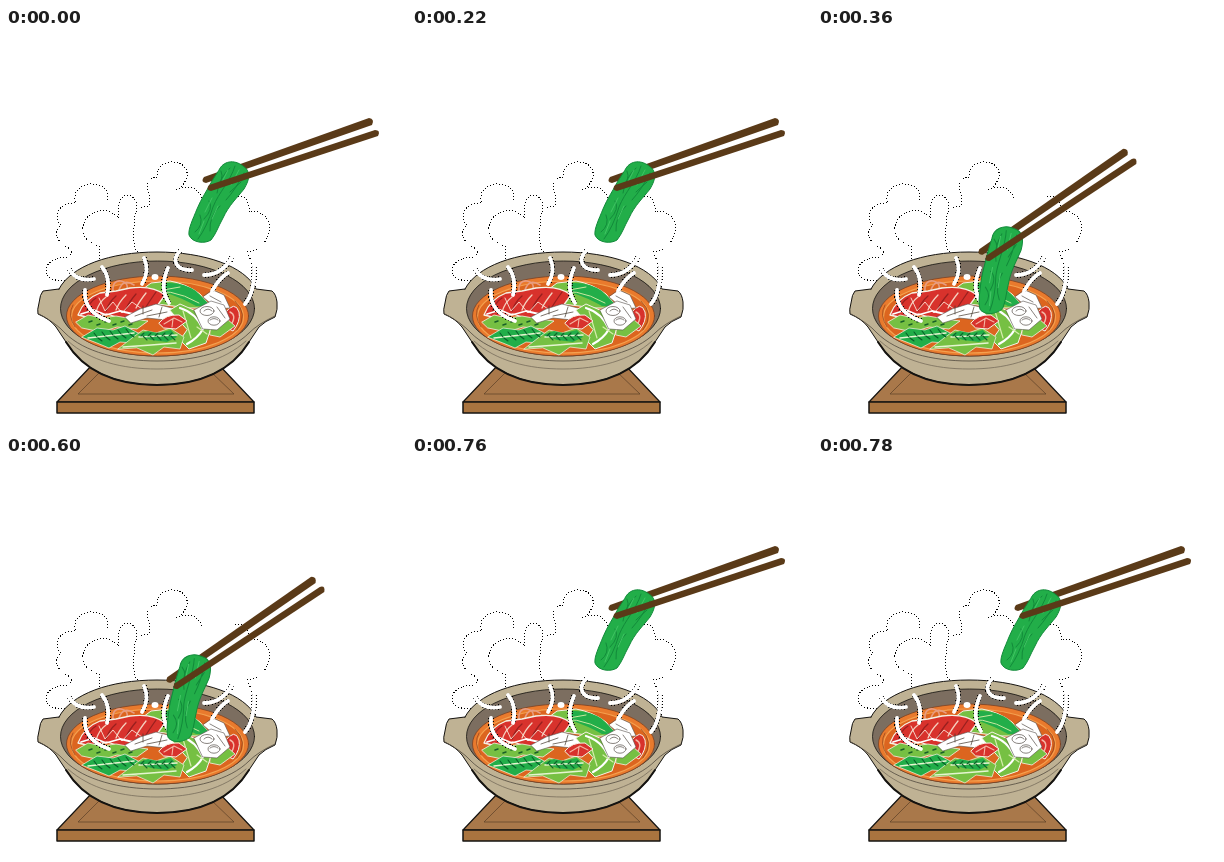
Write an HTML page that moves like this. It is 400x400 px and loops after 800 ms.

```html
<!DOCTYPE html>
<html lang="en">
<head>
<meta charset="utf-8">
<title>Hot pot</title>
<style>
html, body { margin: 0; width: 100%; height: 100%; overflow: hidden; background: #fff; }
svg { display: block; width: 100vw; height: 100vh; }
</style>
</head>
<body>
<svg id="stage" viewBox="0 0 400 400" stroke-linecap="round" stroke-linejoin="round"></svg>
<script>
const stage = document.getElementById('stage');

function add(tag, attrs, parent = stage) {
  const el = document.createElementNS('http://www.w3.org/2000/svg', tag);
  for (const key in attrs) el.setAttribute(key, attrs[key]);
  return parent.appendChild(el);
}
const shape = (d, fill, stroke = 'none', width = 1, parent = stage) =>
  add('path', { d, fill, stroke, 'stroke-width': width }, parent);
const line = (d, stroke, width = 1, parent = stage) => shape(d, 'none', stroke, width, parent);
const oval = (cx, cy, rx, ry, fill, stroke = 'none', width = 1) =>
  add('ellipse', { cx, cy, rx, ry, fill, stroke, 'stroke-width': width });
const dotted = (d, width, dash) => add('path', {
  d, fill: 'none', stroke: '#000', 'stroke-width': width, 'stroke-dasharray': dash,
  'stroke-linecap': 'butt', 'shape-rendering': 'crispEdges'
});

const ink = '#151310', clay = '#bfb294', wood = '#5a3a18';
const green = '#22ae49', darkGreen = '#128a3a', lime = '#76c043', red = '#d8322c', cream = '#f6f3e6';

function wisp(d) {
  dotted(d, 5.6, '1 2');
  line(d, '#fff', 3.8);
}

function drawStand() {
  shape('M51 374L86 337H213L248 374Z', '#a9784a', ink, 1.2);
  line('M99 339L72 366H228L203 342', '#5b3f28', .7);
  shape('M51 374H248V385H51Z', '#a9743f', ink, 1.5);
}

function drawClouds() {
  [
    'M62 252C48 254 40 250 40 243C40 234 50 228 64 230C66 225 65 222 65 221C50 216 47 203 55 197C47 189 52 174 70 175C65 162 78 155 87 156C99 157 104 165 101 173',
    'M96 240C93 232 94 224 93 218C80 214 76 207 77 198C79 187 90 181 103 183C108 186 111 188 113 190C110 178 114 168 121 167C128 167 131 174 131 181',
    'M138 256C144 240 142 229 130 222C126 211 127 201 129 196C126 187 132 178 143 178C144 170 143 166 142 162C140 153 145 149 151 150C150 139 159 133 168 134C177 134 184 143 180 151C178 157 174 160 169 162C181 156 193 160 196 170',
    'M229 169C236 166 244 171 243 184C255 181 266 191 263 203C261 216 251 224 240 224C247 232 248 244 246 262'
  ].forEach(d => dotted(d, 1, '1 2'));
}

function drawBowl() {
  shape('M53 261L37 263Q34 266 33 275Q31 282 32 286Q44 291 50 299L62 317C79 344 113 357 151 357C190 357 224 344 241 317L253 299Q259 293 269 289Q272 281 271 274Q270 266 266 263L250 261C239 238 198 224 151 224C104 224 65 238 53 261Z', clay, ink, 1);
  line('M60 314C79 345 113 357 151 357C190 357 224 345 243 314', ink, 2);
  line('M33 286Q50 295 59 305C78 324 114 333 151 333C188 333 224 324 243 305Q252 296 269 288', '#514a3e', .8);
  line('M62 313C84 333 116 341 151 341C186 341 218 333 240 313', '#6d6453', .7);
  oval(151.5, 280.5, 97, 47.5, '#7c6e60', ink, .8);
  oval(151.5, 288, 91, 40, '#e97a2d', '#7c4022', .8);
  oval(151.5, 289, 86, 36, '#dc651f', '#f4a150', 1.2);
  line('M67 277Q61 287 69 299M229 273Q243 286 231 302', '#8c411d', .7);
}

function drawFood() {
  // back greens and onion rings
  shape('M126 270L137 261L145 255L164 253Q181 256 194 266L206 280L183 280L151 276Z', lime, cream, 1);
  shape('M160 255Q177 254 190 263L205 278L190 278Q176 270 158 264Z', green);
  line('M140 266Q163 258 193 275M157 262L174 259', '#c9e89e', 1);
  line('M107 264Q106 252 115 253Q124 255 120 264M113 262Q117 250 128 257', '#e79c82', 1.6);

  // sliced meat
  shape('M72 287Q78 271 94 265L110 263L124 260Q147 257 159 267L151 278L132 283L117 291L101 286L85 290Z', red, cream, 1.3);
  for (let i = 0; i < 7; i++) {
    const x = 80 + i * 10;
    line(`M${x} ${285 - i}Q${x + 3} 274 ${x + 10} ${270 - i}`, i % 2 ? '#f5cfbe' : '#98201f', 1.3);
  }
  line('M93 270L99 283L107 274L116 285L126 274L136 281', '#f9e1d4', .9);
  line('M75 286L88 282L100 287L114 283L127 286', '#fff', 1.8);

  // cabbage and mushrooms
  shape('M70 294L82 287L96 290L110 288L127 291L142 293L131 301L111 299L95 304L76 300Z', lime, cream, .8);
  for (let i = 0; i < 6; i++) line(`M${83 + i * 8} ${294 + i % 2 * 3}l3 -1`, '#175f28', 1.5);
  shape('M119 289L134 281L150 276L166 280L180 288L160 292L141 290L125 295Z', '#fff', '#57504a', .6);
  line('M129 288L146 282M141 288L161 284M137 278V286M156 279L153 289', '#43372c', .7);
  shape('M164 282L174 276L190 283L205 300L200 315L183 321L174 312L181 302Z', lime, cream, 1);
  line('M174 280Q190 285 197 301Q192 310 181 316', '#fff', 2.2);
  line('M177 283L185 310M191 299L201 306', '#d5edab', 1.2);

  // front leaves
  shape('M76 309L91 300L107 302L119 298L134 306L128 315L114 314L103 320L91 315Z', green, cream, .7);
  shape('M112 321L126 310L137 302L150 305L164 300L178 309L174 321L158 319L147 327L131 320Z', lime, cream, .7);
  shape('M131 307L142 303L152 305L165 302L171 309L161 314L145 312Z', green);
  line('M82 310L128 305M133 309L171 307M117 319L145 317L170 315', '#e5f5d0', 1.5);
  for (let i = 0; i < 5; i++) {
    line(`M${91 + i * 8} ${309 - i}l-3 -4M${92 + i * 8} ${310 - i}l4 3`, '#075f28', 1.1);
    line(`M${135 + i * 7} 308l3 -3m-1 3l4 4`, '#12652c', 1.1);
  }

  // lotus, tofu and tomatoes
  shape('M219 285Q229 272 233 284Q235 293 227 303L219 299Z', red, cream, 1);
  line('M224 284Q231 287 225 297', '#f4b7a5', 1.4);
  shape('M205 298L220 290L229 298L214 309L204 307Z', lime, cream, .8);
  shape('M207 262L218 267L224 280L211 281L197 269Z', '#fff', '#57504a', .6);
  shape('M188 282L205 273L218 277L224 291L211 302L197 301Z', '#fff', '#57504a', .6);
  oval(201, 283, 7, 4.5, '#fff', '#57504a', .7);
  oval(208, 293, 6, 4.2, '#fff', '#57504a', .7);
  line('M198 283Q202 279 206 283M204 292Q208 289 212 292M211 279L219 290M204 268L215 274', '#57504a', .7);
  shape('M153 295Q160 286 173 287L181 293L170 301L158 300Z', red, cream, 1);
  line('M158 296L168 290L176 294M167 291L166 299', '#f4b7a5', 1.1);
  oval(149, 249, 3.5, 3, '#fff');
}

function drawWisps() {
  [
    'M63 241Q70 254 88 251',
    'M96 239Q105 250 101 267',
    'M79 262Q77 284 103 293',
    'M138 230Q144 243 136 256',
    'M162 240Q153 260 163 275',
    'M174 223C165 232 170 243 186 242',
    'M226 229Q216 247 198 247',
    'M222 245Q214 249 206 263',
    'M248 239Q249 264 239 276'
  ].forEach(wisp);
}

function drawUtensil() {
  const group = add('g', {});
  shape('M198 149L363 90Q369 91 366 97L200 155Q194 154 198 149Z', wood, 'none', 1, group);
  shape('M213 142C217 133 228 131 237 138C245 143 244 151 238 161C231 170 223 177 217 190C212 199 210 206 205 212C199 216 186 215 183 207C182 201 187 191 191 181C195 171 202 161 206 153Z', green, darkGreen, 1, group);
  line('M229 138C224 154 213 164 207 179Q201 199 192 211M215 143Q219 152 209 160M238 145Q230 161 220 172M203 173Q208 181 198 191M214 178Q203 188 204 203M194 187Q198 197 189 204M224 140Q213 150 211 165M235 154L224 164', darkGreen, 1, group);
  line('M222 142L216 154M233 142L225 157M206 170L199 184M212 178L206 191M198 193L193 206', '#45c767', .9, group);
  shape('M203 157L369 102Q375 102 372 108L205 163Q199 162 203 157Z', wood, 'none', 1, group);
  return group;
}

drawStand();
drawClouds();
drawBowl();
drawFood();
drawWisps();
const utensil = drawUtensil();

const LOOP = 800, DIP_START = 360, DIP_END = 760;
const DIPPED = 'translate(163 224) rotate(-15.3) translate(-199 -152)';

function render(time) {
  const t = time % LOOP;
  utensil.setAttribute('transform', t >= DIP_START && t < DIP_END ? DIPPED : '');
}

const start = performance.now();
function tick() {
  render(performance.now() - start);
  requestAnimationFrame(tick);
}
render(0);
requestAnimationFrame(tick);
</script>
</body>
</html>
```
